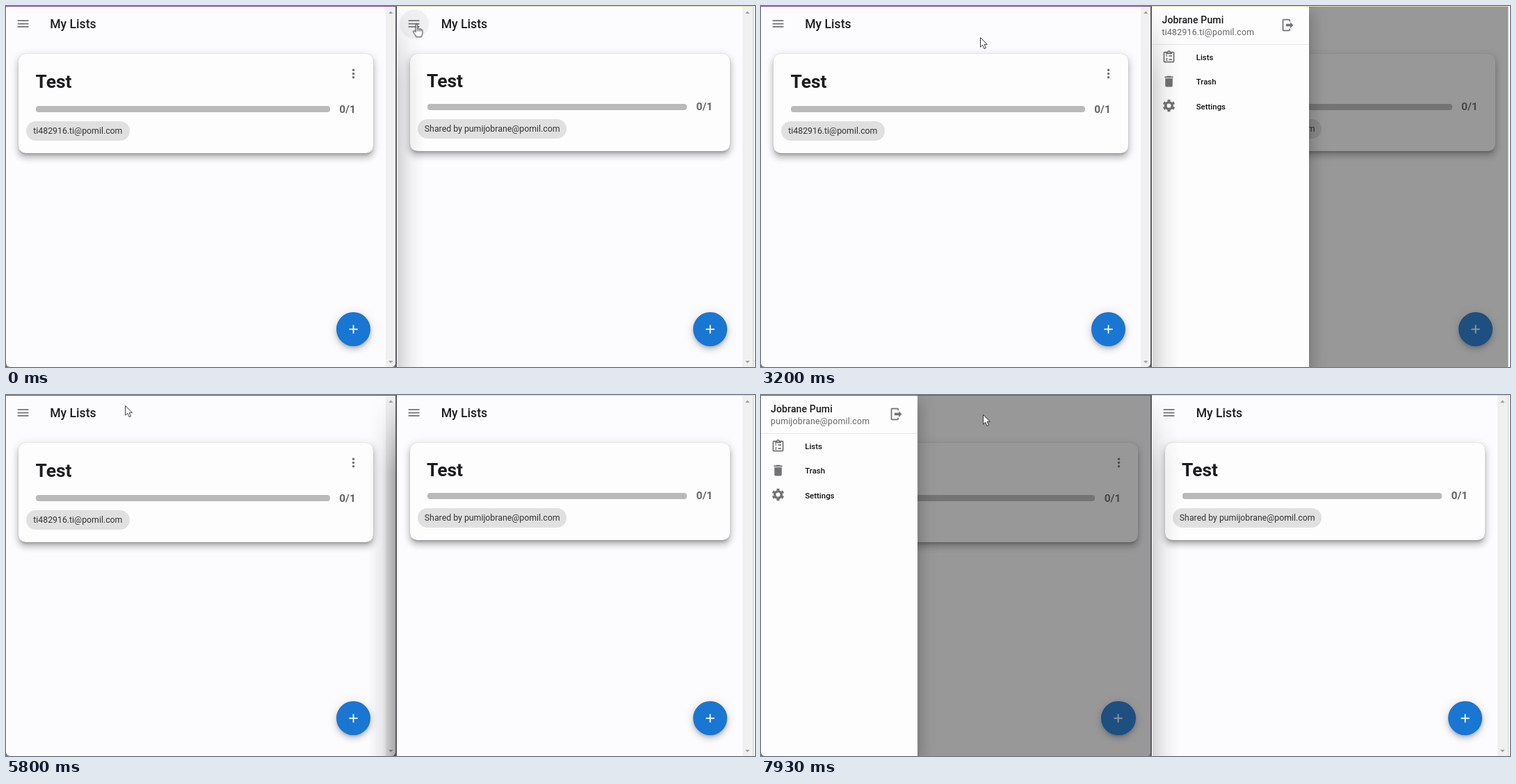
Write an HTML page that moves like this. It is 1077 by 520 pixels and loops after 8000 ms.

```html
<!DOCTYPE html>
<html lang="en">
<head>
<meta charset="utf-8">
<title>Shared lists</title>
<style>
html, body { margin: 0; width: 100%; height: 100%; overflow: hidden; background: #fff; }
#stage { position: absolute; left: 0; top: 0; width: 1077px; height: 520px; overflow: hidden; font-family: Roboto, sans-serif; color: #1c1c1e; }
#stage div, #stage svg { position: absolute; }
.t { line-height: 0; white-space: pre; }
.corner { left: 0; top: 500px; width: 562px; height: 20px; background: #77747c; }
.pane { top: 1px; height: 519px; overflow: hidden; background: #fcfcfe; }
.in { left: 0; top: -1px; width: 100%; height: 520px; }
.page { left: 0; top: 0; bottom: 0; right: 14.5px; overflow: hidden; }
.card { left: 18px; right: 18px; top: 69px; border-radius: 10.5px; background: #fdfdfe;
  box-shadow: 0 4.4px 4.4px -2.6px rgba(0,0,0,.26), 0 7px 9px 1px rgba(0,0,0,.15), 0 2.6px 12px 2px rgba(0,0,0,.12), 0 0 1px rgba(0,0,0,.2); }
.bar { left: 43px; right: 80px; height: 9px; border-radius: 4px; background: #bababa; }
.chip { left: 29px; height: 28px; border-radius: 14px; background: #e0e0e0; }
.fab { right: 21.8px; top: 440.8px; width: 49.3px; height: 49.3px; border-radius: 50%; background: #1976d2;
  box-shadow: 0 2.6px 4.4px -1px rgba(0,0,0,.2), 0 5.3px 9px rgba(0,0,0,.14), 0 1px 16px rgba(0,0,0,.12); }
.hover { left: 3.5px; top: 4.9px; width: 42.2px; height: 42.2px; border-radius: 50%; background: #000; opacity: 0; }
.scrim { inset: 0; background: #212121; opacity: 0; }
.track { right: 0; top: 0; bottom: 0; width: 14.5px; background: #f0f0f1; }
.drawer { left: 0; top: 0; width: 225px; height: 520px; background: #fdfdfe; visibility: hidden;
  box-shadow: 0 7px 9px -4px rgba(0,0,0,.2), 0 14px 21px 2px rgba(0,0,0,.14), 0 5px 26px 4px rgba(0,0,0,.12); }
.rule { left: 0; right: 0; top: 55px; height: 1px; background: #e6e6e8; }
.shade { top: 1px; height: 519px; width: 38px; opacity: 0; -webkit-mask-image: linear-gradient(transparent, #000 110px); mask-image: linear-gradient(transparent, #000 110px); }
#cursor { left: 0; top: 0; width: 0; height: 0; }
#cursor svg { overflow: visible; }
</style>
</head>
<body>
<div id="stage"></div>
<script>
const LOOP = 8000;
const stage = document.getElementById('stage');
const GREY = '#727274';

// Text placed by its baseline
const text = (x, base, size, weight, str, extra = '') =>
  `<div class="t" style="left:${x}px;top:${base - .342 * size}px;font-size:${size}px;font-weight:${weight};${extra}">${str}</div>`;

// 24-unit icon centred on a point; side is 'left' or 'right'
const icon = (x, y, body, fill = GREY, side = 'left') =>
  `<svg viewBox="0 0 24 24" width="21.1" height="21.1" fill="${fill}" style="${side}:${x - 10.55}px;top:${y - 10.55}px">${body}</svg>`;
const path = d => `<path fill-rule="evenodd" d="${d}"/>`;

const MENU = path('M3 6H21V8H3ZM3 11H21V13H3ZM3 16H21V18H3Z');
const DOTS = [6, 12, 18].map(y => `<circle cx="12" cy="${y}" r="2"/>`).join('');
const PLUS = path('M11 5H13V11H19V13H13V19H11V13H5V11H11Z');
const EXIT = path('M16 17V14H9V10H16V7L21 12ZM14 2A2 2 0 0 1 16 4V6H14V4H5V20H14V18H16V20A2 2 0 0 1 14 22H5A2 2 0 0 1 3 20V4A2 2 0 0 1 5 2Z');
const BOARD = path('M19 3H14.8A3 3 0 0 0 9.2 3H5A2 2 0 0 0 3 5V19A2 2 0 0 0 5 21H19A2 2 0 0 0 21 19V5A2 2 0 0 0 19 3ZM12 3A1 1 0 1 1 12 5A1 1 0 1 1 12 3ZM7 7H17V5H19V19H5V5H7Z')
  + path('M12 9H17V11H12ZM12 15H17V17H12ZM7 8H9V12H8V9H7ZM7 14H10V15.2L8.3 17H10V18H7V16.9L8.7 15H7Z');
const BIN = path('M19 4H15.5L14.5 3H9.5L8.5 4H5V6H19ZM6 19A2 2 0 0 0 8 21H16A2 2 0 0 0 18 19V7H6Z');
const COG = `<g fill="none" stroke="${GREY}"><circle cx="12" cy="12" r="5.5" stroke-width="4"/>
  <circle cx="12" cy="12" r="8.5" stroke-width="3" pathLength="60" stroke-dasharray="5 5" stroke-dashoffset="-2.5"/></g>`;

const USER = 'Jobrane Pumi';
const OWNER = 'pumijobrane@pomil.com';
const GUEST = 'ti482916.ti@pomil.com';

function pane(o) {
  const el = document.createElement('div');
  el.className = 'pane';
  el.style.cssText = `left:${o.x}px;width:${o.w}px;border-radius:${o.round}`;
  const items = [['Lists', BOARD, 73.3], ['Trash', BIN, 108.8], ['Settings', COG, 144]];
  const arrow = (y, d) => `<svg width="14.5" height="8" viewBox="0 0 14.5 8" style="left:0;top:${y}px" fill="#a0a0a2"><path d="${d}"/></svg>`;
  el.innerHTML = `<div class="in">
    <div class="page">
      <div class="hover"></div>
      ${icon(24.5, 25.8, MENU)}
      ${text(63.2, 32.2, 17.6, 500, 'My Lists')}
      <div class="card" style="height:${o.bottom - 69}px"></div>
      ${text(42.6, o.title, 26.4, 700, 'Test')}
      ${o.dots ? icon(46, 98, DOTS, GREY, 'right') : ''}
      <div class="bar" style="top:${o.bar - 4.5}px"></div>
      <div class="t" style="right:43px;top:${o.bar + .4}px;font-size:15.5px;font-weight:700;color:#666668">0/1</div>
      <div class="chip" style="top:${o.chip - 14}px;width:${o.chipW}px"></div>
      ${text(39.3, o.chip + 4.5, 12.32, 400, o.label, 'color:#333335')}
      <div class="fab">${icon(24.65, 24.65, PLUS, '#fff')}</div>
      <div class="scrim"></div>
    </div>
    <div class="track">${arrow(5, 'M4 6L7.3 2.5L10.6 6Z')}${arrow(509, 'M4 2L7.3 5.5L10.6 2Z')}</div>
    <div class="drawer">
      ${text(14, 24.7, 14.08, 500, USER, 'letter-spacing:.1px')}
      ${text(14, 42.3, 12.32, 400, o.mail, 'letter-spacing:.22px;color:#666668')}
      ${icon(195, 27.8, EXIT)}
      <div class="rule"></div>
      ${items.map(([name, pic, y]) => icon(24.5, y, pic) + text(63.2, y + 4.5, 11.44, 500, name, 'color:#111')).join('')}
    </div>
  </div>`;
  stage.append(el);
  return name => el.querySelector('.' + name);
}

stage.insertAdjacentHTML('beforeend', '<div class="corner"></div>');
const left = pane({ x: 0, w: 560.3, round: '0 0 6px 6px', bottom: 212, title: 118.4, dots: true,
  bar: 148.5, chip: 180.2, chipW: 148.5, label: GUEST, mail: OWNER });
const right = pane({ x: 562.5, w: 511.2, round: '0', bottom: 209, title: 116.6, dots: false,
  bar: 145, chip: 176.8, chipW: 214.5, label: 'Shared by ' + OWNER, mail: GUEST });

stage.insertAdjacentHTML('beforeend', `
  <div id="shadeL" class="shade" style="left:522.3px;background:linear-gradient(to left,rgba(0,0,0,.3),rgba(0,0,0,.08) 50%,transparent)"></div>
  <div id="shadeR" class="shade" style="left:562.5px;background:linear-gradient(to right,rgba(0,0,0,.16),rgba(0,0,0,.05) 50%,transparent)"></div>
  <div style="left:0;top:0;width:561px;height:1px;background:#7b4a93"></div>
  <div style="left:562px;top:0;width:512px;height:1px;background:#dcdcb8"></div>
  <div style="left:560.3px;top:0;width:2.2px;height:520px;background:#59565e"></div>
  <div style="left:1073.7px;top:0;width:1px;height:520px;background:#d0d0d2"></div>
  <div id="cursor">
    <svg id="arrow" width="12" height="18"><path d="M.5 .5V14.2L3.7 11.2L6 16.6L8.4 15.6L6.1 10.3H10.4Z" fill="#fff" stroke="#222" stroke-width=".9"/></svg>
    <svg id="hand" width="16" height="20"><path d="M-1.3 .9Q-1.3-.5 0-.5T1.3 .9V6.2Q2.4 5.3 3.7 6.6Q5 5.8 6 7.2Q8.4 6.9 8.4 9.4V12.5Q8.2 15 6.8 18H-.7Q-1.2 16-3.2 13.6L-5 10.8Q-5.2 8.9-3.2 9.2L-1.3 11Z" fill="#fff" stroke="#222"/><path d="M1.3 6V10M3.7 7V10M6 7.5V10" stroke="#222" stroke-width=".8"/></svg>
    <svg id="beam" width="8" height="14"><path d="M-3-6.5H-.9L0-5.8L.9-6.5H3M0-5.8V5.8M-3 6.5H-.9L0 5.8L.9 6.5H3" fill="none" stroke="#222" stroke-width="1.1"/></svg>
  </div>`);
const id = name => document.getElementById(name);

// rows: [time, properties, easing to the next row]
function play(el, rows) {
  const all = [...rows, [LOOP, rows[rows.length - 1][1]]];
  el.animate(all.map(([t, p, e]) => ({ offset: t / LOOP, easing: e || 'linear', ...p })),
    { duration: LOOP, iterations: Infinity });
}
const steps = (el, prop, rows) => play(el, rows.map(([t, v]) => [t, { [prop]: v }, 'step-end']));

// Drawers, with the scrollbar hidden while one is open
const SLIDE = 'cubic-bezier(.4,0,.2,1)';
const shut = { transform: 'translateX(-225px)', visibility: 'hidden' };
const open = { transform: 'translateX(0)', visibility: 'visible' };
const clear = { opacity: 0 }, dim = { opacity: .46 };

play(right('drawer'), [[0, shut], [300, shut, SLIDE], [500, open], [5366, open, SLIDE], [5566, shut]]);
play(right('scrim'), [[0, clear], [300, clear, 'ease-out'], [500, dim], [5366, dim, 'cubic-bezier(.25,.8,.5,1)'], [5566, clear]]);
steps(right('page'), 'right', [[0, '14.5px'], [300, '0px'], [5366, '14.5px']]);
steps(right('track'), 'opacity', [[0, 1], [300, 0], [5366, 1]]);

play(left('drawer'), [[0, shut], [6800, shut, SLIDE], [7000, open]]);
play(left('scrim'), [[0, clear], [6800, clear, 'cubic-bezier(.25,.46,.45,.94)'], [7000, dim]]);
steps(left('page'), 'right', [[0, '14.5px'], [6800, '0px']]);
steps(left('track'), 'opacity', [[0, 1], [6800, 0]]);

// The window in front casts a shadow on the other
steps(id('shadeL'), 'opacity', [[0, 0], [270, 1], [3050, 0], [5330, 1], [6740, 0]]);
steps(id('shadeR'), 'opacity', [[0, 1], [270, 0], [3050, 1], [5330, 0], [6740, 1]]);

steps(right('hover'), 'opacity', [[0, .045], [70, .08], [130, .06], [480, 0]]);
steps(left('hover'), 'opacity', [[0, 0], [6050, .045], [6740, .09], [6850, 0]]);

// Pointer path: time, x, y
const EASE = 'ease-in-out';
const at = (t, x, y, e = EASE) => [t, { transform: `translate(${x}px,${y}px)` }, e];
play(id('cursor'), [
  at(0, 590.5, 26.5), at(320, 590.5, 26.5), at(1060, 618, 33), at(1210, 618, 33),
  at(1930, 453, 68, 'linear'), at(2000, 450, 69), at(2070, 404, 84), at(2470, 404, 84),
  at(2730, 315, 45), at(3800, 315, 45), at(4150, 64, 176), at(4350, 150, 186),
  at(4670, 775, 62, 'ease-out'), at(5000, 819, 49), at(5480, 819, 49, 'ease-in'),
  at(5800, 172, 15, 'ease-out'), at(6080, 27, 25), at(6800, 27, 25),
  at(6870, 37, 29), at(7100, 22, 38), at(7330, 22, 38), at(7650, 150, 40),
  at(7930, 319, 28)
]);
const shapes = [[0, 'hand'], [480, 'arrow'], [760, 'beam'], [1460, 'arrow'], [6050, 'hand'],
  [6830, 'arrow'], [7000, 'beam'], [7680, 'arrow']];
for (const name of ['arrow', 'hand', 'beam'])
  steps(id(name), 'opacity', shapes.map(([t, s]) => [t, s === name ? 1 : 0]));
</script>
</body>
</html>
```
